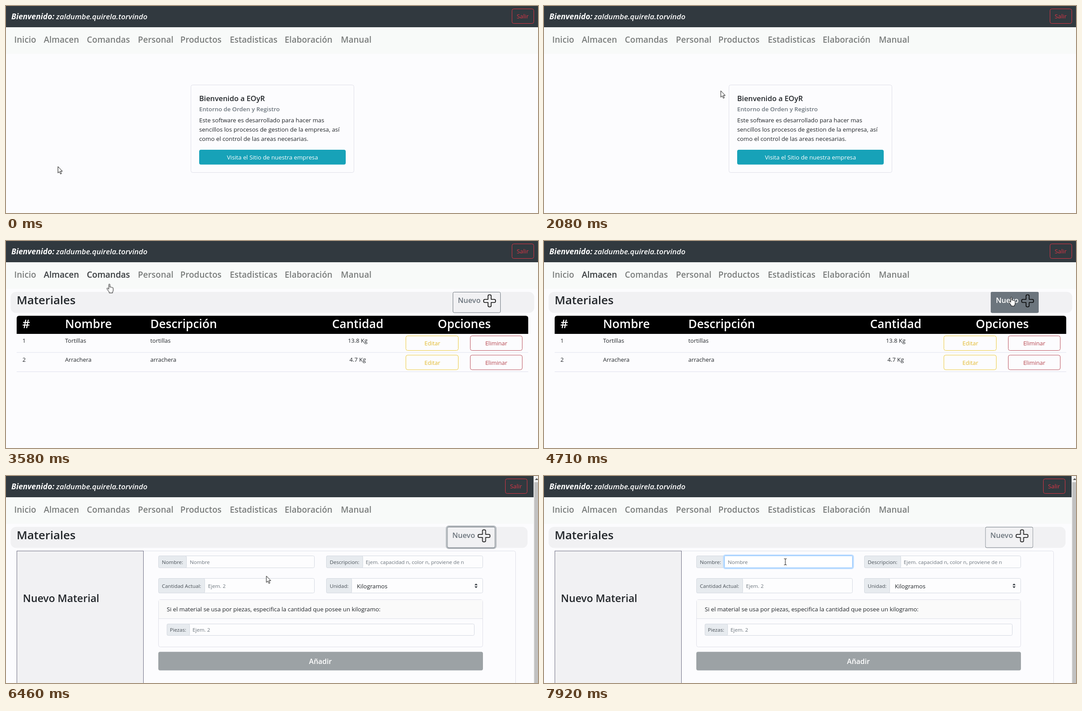
Animation of 1198x468 px, one loop 8000 ms. Source, as an HTML page:

```html
<!DOCTYPE html>
<html lang="es">
<head>
<meta charset="utf-8">
<title>Materiales</title>
<style>
html, body { margin: 0; width: 100%; height: 100%; overflow: hidden; background: #fcfcfe; }
svg { display: block; }
text { font-family: "Open Sans", "Noto Sans", sans-serif; font-size: 13.3px; fill: #212529; }
.mid { text-anchor: middle; }
.semi { font-weight: 600; }
.white { fill: #fff; }
.line { fill: none; stroke: #dedfe8; }
.user { font-style: italic; font-weight: 600; font-size: 17px; }
.user .bold { font-weight: 700; }
.nav text { font-size: 19px; font-weight: 600; fill: #7a7d7c; }
.nav .dark { fill: #45494c; }
.new { font-size: 16.4px; font-weight: 600; fill: #6c757d; }
.th text { font-size: 26.6px; font-weight: 600; fill: #fff; }
.td text { font-size: 13px; }
.edit { fill: none; stroke: #ecc93a; }
.td .editT { fill: #e2b92c; }
.del { fill: none; stroke: #b9505c; }
.td .delT { fill: #b5434c; }
.form text { font-size: 11.65px; fill: #495057; }
.form .ph { fill: #6c757d; }
.form .big { font-size: 13.2px; fill: #212529; }
.box { fill: #fdfdfe; stroke: #d3d8e0; }
.tag { fill: #e7ebef; stroke: #d3d8e0; }

/* Every animation shares one 8 s clock; switches use step-end. */
.sw, .cursor, .slide { animation: 8s step-end infinite; }
.home { animation-name: home; }
.mat { animation-name: mat; }
.rows { animation-name: rows; }
.almacen { animation-name: almacen; }
.comandas { animation-name: comandas; }
.hover { animation-name: hover; }
.ring { animation-name: ring; }
.scroll { animation-name: scroll; }
.exit { animation-name: exit; }
.add { animation-name: add; }
.bar { animation-name: bar; }
.focus { animation-name: focus; animation-timing-function: ease-in-out; }
.arrow { animation-name: arrow; }
.hand { animation-name: hand; }
.beam { animation-name: beam; }
.slide { animation-name: slide; animation-timing-function: ease; }
.cursor { animation-name: move; animation-timing-function: ease-in-out; }

@keyframes home { 0% { opacity: 1 } 32.2%, 100% { opacity: 0 } }
@keyframes mat { 0% { opacity: 0 } 32.2%, 100% { opacity: 1 } }
@keyframes rows { 0% { opacity: 0 } 34.3%, 100% { opacity: 1 } }
@keyframes almacen { 0% { opacity: 0 } 29% { opacity: 1 } 66.6%, 100% { opacity: 0 } }
@keyframes comandas { 0% { opacity: 0 } 42.7% { opacity: 1 } 45.1%, 100% { opacity: 0 } }
@keyframes hover { 0% { opacity: 0 } 57.6% { opacity: 1 } 76.5%, 100% { opacity: 0 } }
@keyframes ring { 0% { opacity: 0 } 66.6% { opacity: 1 } 94.4%, 100% { opacity: 0 } }
@keyframes scroll { 0% { opacity: 0 } 68.5%, 100% { opacity: 1 } }
@keyframes exit { 0% { transform: none } 68.5%, 100% { transform: translateX(-15px) } }
@keyframes add { 0% { transform: none } 68.5%, 100% { transform: translateX(-12.5px) } }
@keyframes bar { 0% { width: 1179px } 68.5%, 100% { width: 1164px } }
@keyframes focus { 0%, 94.4% { opacity: 0 } 96.2%, 100% { opacity: 1 } }
@keyframes arrow { 0% { opacity: 1 } 29% { opacity: 0 } 45.1% { opacity: 1 } 57.6% { opacity: 0 } 76.5% { opacity: 1 } 93.6%, 100% { opacity: 0 } }
@keyframes hand { 0% { opacity: 0 } 29% { opacity: 1 } 45.1% { opacity: 0 } 57.6% { opacity: 1 } 76.5%, 100% { opacity: 0 } }
@keyframes beam { 0% { opacity: 0 } 93.6%, 100% { opacity: 1 } }
@keyframes slide { 0%, 66.6% { transform: none } 71.2%, 100% { transform: translateY(320px) } }
@keyframes move {
  0% { transform: translate(117px, 363px) }
  10.4% { transform: translate(115px, 353px) }
  15.6% { transform: translate(124px, 224px) }
  17.2% { transform: translate(150px, 104px) }
  19.5% { transform: translate(733px, 300px) }
  20.9% { transform: translate(705px, 320px) }
  30.8%, 40.6% { transform: translate(124px, 77px) }
  44.7% { transform: translate(233px, 97px) }
  46.3% { transform: translate(30px, 220px) }
  50.5% { transform: translate(1150px, 192px) }
  53.8% { transform: translate(57px, 258px) }
  58.4%, 75.5% { transform: translate(1052px, 127px) }
  80.7% { transform: translate(587px, 226px) }
  83.1% { transform: translate(60px, 290px) }
  85.4% { transform: translate(95px, 300px) }
  90% { transform: translate(500px, 420px) }
  94.2%, 100% { transform: translate(543.5px, 194px) }
}
</style>
</head>
<body>
<svg width="1198" height="468" viewBox="0 0 1198 468">
  <rect width="1198" height="468" fill="#fcfcfe"/>

  <g class="sw home">
    <rect class="line" x="416.5" y="178.5" width="367" height="198" rx="4"/>
    <text class="semi" x="435" y="215" style="font-size:16.4px">Bienvenido a EOyR</text>
    <text class="semi" x="435" y="238" style="fill:#6c757d">Entorno de Orden y Registro</text>
    <text x="435" y="263">Este software es desarrollado para hacer mas</text>
    <text x="435" y="284">sencillos los procesos de gestion de la empresa, así</text>
    <text x="435" y="305">como el control de las areas necesarias.</text>
    <rect x="435" y="325" width="330" height="33.5" rx="4" fill="#17a2b8"/>
    <text class="mid white" x="600" y="347">Visita el Sitio de nuestra empresa</text>
  </g>

  <g class="sw mat">
    <g class="form">
      <rect class="line" x="24.5" y="169.5" width="1123" height="315" rx="4"/>
      <rect x="24.5" y="169.5" width="285" height="315" fill="#f1f1f3" stroke="#6b6b80"/>
      <text class="semi" x="38" y="285" style="font-size:23.2px;fill:#212529">Nuevo Material</text>

      <rect class="box" x="343.5" y="180.5" width="351" height="27" rx="3"/>
      <rect class="tag" x="343.5" y="180.5" width="63" height="27" rx="3"/>
      <text x="351" y="199">Nombre:</text>
      <g class="sw focus">
        <rect x="404.5" y="179" width="292" height="30" rx="4" fill="none" stroke="#bfdeff" stroke-width="3"/>
        <rect x="406.5" y="180.5" width="288" height="27" rx="2" fill="#fff" stroke="#80bdff"/>
      </g>
      <text class="ph" x="414" y="199">Nombre</text>

      <rect class="box" x="721.5" y="180.5" width="352" height="27" rx="3"/>
      <rect class="tag" x="721.5" y="180.5" width="82" height="27" rx="3"/>
      <text x="729" y="199">Descripcion:</text>
      <text class="ph" x="810" y="199">Ejem. capacidad n, color n, proviene de n</text>

      <rect class="box" x="343.5" y="231.5" width="351" height="33" rx="3"/>
      <rect class="tag" x="343.5" y="231.5" width="104" height="33" rx="3"/>
      <text x="351" y="253">Cantidad Actual:</text>
      <text class="ph" x="455" y="253">Ejem. 2</text>

      <rect class="box" x="721.5" y="231.5" width="352" height="33" rx="3"/>
      <rect class="tag" x="721.5" y="231.5" width="57" height="33" rx="3"/>
      <text x="729" y="253">Unidad:</text>
      <text class="big" x="790" y="254">Kilogramos</text>
      <path d="M1055 247l3.5-4 3.5 4zm0 2.5l3.5 4 3.5-4z" fill="#343a40"/>

      <rect class="line" x="343.5" y="279.5" width="730" height="107" rx="4"/>
      <rect x="344" y="280" width="729" height="42" fill="#fafafa"/>
      <path class="line" d="M344 322.5h729"/>
      <text class="big" x="362" y="306">Si el material se usa por piezas, especifica la cantidad que posee un kilogramo:</text>
      <rect class="box" x="362.5" y="334.5" width="692" height="26" rx="3"/>
      <rect class="tag" x="362.5" y="334.5" width="51" height="26" rx="3"/>
      <text x="369" y="352">Piezas:</text>
      <text class="ph" x="420" y="352">Ejem. 2</text>

      <rect x="343" y="397.5" width="731" height="42" rx="4" fill="#9ca2a5"/>
      <text class="mid semi" x="708" y="425" style="font-size:16px;fill:#fff">Añadir</text>
    </g>

    <!-- The table slides down and uncovers the form. -->
    <g class="slide">
      <rect y="166" width="1198" height="480" fill="#fcfcfe"/>
      <path d="M24 210v-35q0-6 6-6h1140q6 0 6 6v35z"/>
      <g class="th">
        <text x="37" y="197">#</text>
        <text x="133" y="197">Nombre</text>
        <text x="325" y="197">Descripción</text>
        <text class="mid" x="792" y="197">Cantidad</text>
        <text class="mid" x="1032" y="197">Opciones</text>
      </g>
      <g class="sw rows td">
        <g id="opts">
          <path d="M24 252h1152" stroke="#dfe0ec"/>
          <rect class="edit" x="900.5" y="214.5" width="118" height="33" rx="4"/>
          <text class="mid editT" x="960" y="236">Editar</text>
          <rect class="del" x="1045.5" y="214.5" width="117" height="33" rx="4"/>
          <text class="mid delT" x="1104" y="236">Eliminar</text>
        </g>
        <use href="#opts" y="43.5"/>
        <text x="37" y="230">1</text>
        <text x="133" y="230">Tortillas</text>
        <text x="325" y="230">tortillas</text>
        <text class="mid" x="792" y="230">13.8 Kg</text>
        <text x="37" y="273">2</text>
        <text x="133" y="273">Arrachera</text>
        <text x="325" y="273">arrachera</text>
        <text class="mid" x="792" y="273">4.7 Kg</text>
      </g>
    </g>

    <rect class="sw bar" x="10.5" y="115" width="1179" height="47.5" rx="12" fill="#f1f1f3"/>
    <text class="semi" x="24" y="143" style="font-size:26px">Materiales</text>
    <g class="sw add">
      <rect class="sw ring" x="1004.5" y="113.5" width="111" height="50" rx="5" fill="none" stroke="#b3b8bd" stroke-width="3"/>
      <rect x="1006.5" y="115.5" width="107" height="46.5" rx="3" fill="none" stroke="#6c757d"/>
      <text class="new" x="1017.5" y="139.5">Nuevo</text>
      <g class="sw hover">
        <rect x="1006" y="115" width="108" height="47.5" rx="3" fill="#6c757d"/>
        <text class="new" x="1017.5" y="139.5" style="fill:#fff">Nuevo</text>
      </g>
      <path d="M1085.5 124q0-2.500 3.500-2.500t3.500 2.500v8h7.500q2.500 0 2.500 3.500t-2.500 3.500h-7.500v7.500q0 2.500-3.500 2.500t-3.500-2.500v-7.500h-7.500q-2.500 0-2.500-3.500t2.500-3.500h7.500z" fill="none" stroke="#000" stroke-width="1.600" stroke-linejoin="round"/>
    </g>
  </g>

  <rect width="1198" height="48" fill="#31393f"/>
  <text class="user white bold" x="12" y="30" style="font-size:17.6px;font-weight:700">Bienvenido:</text>
  <text class="user white" x="113" y="30">zaldumbe.quirela.torvindo</text>
  <g class="sw exit">
    <rect x="1139.5" y="6.5" width="49" height="33" rx="4" fill="none" stroke="#dc3545"/>
    <text class="mid" x="1163.5" y="28" style="fill:#dc3545">Salir</text>
  </g>

  <rect y="48" width="1198" height="60" fill="#f8faf9"/>
  <g class="nav">
    <text x="18.5" y="83">Inicio</text>
    <text x="85" y="83">Almacen</text>
    <text x="182" y="83">Comandas</text>
    <text x="297" y="83">Personal</text>
    <text x="392.5" y="83">Productos</text>
    <text x="504" y="83">Estadisticas</text>
    <text x="627.5" y="83">Elaboración</text>
    <text x="754" y="83">Manual</text>
    <text class="sw almacen dark" x="85" y="83">Almacen</text>
    <text class="sw comandas dark" x="182" y="83">Comandas</text>
  </g>

  <g class="sw scroll">
    <rect x="1188" width="10" height="468" fill="#f1f1f1"/>
    <rect x="1189.5" y="14" width="8.5" height="454" fill="#c1c1c1"/>
    <path d="M1191 9l4-4 3 3v1z" fill="#505050"/>
  </g>

  <g class="cursor" stroke="#000" fill="#fff">
    <path class="sw arrow" d="M0 0v14.500l3.300-3 2.400 5.300 2.300-1-2.400-5.200h4.400z"/>
    <path class="sw hand" d="M-1 1.500q0-1.500 1.300-1.500t1.400 1.500v5.500q1.600-1 2.600.4 1.700-.7 2.500.6 2.200-.4 2.200 1.700v4.300q0 2.500-1.500 4v2h-7.500v-2l-4.800-6.500q-1-1.500 0-2.200t2.300.6l1.500 1.700z"/>
    <path class="sw beam" d="M-3-7h2l1 1 1-1h2M0-6v12M-3 7h2l1-1 1 1h2" fill="none"/>
  </g>
</svg>
</body>
</html>
```
